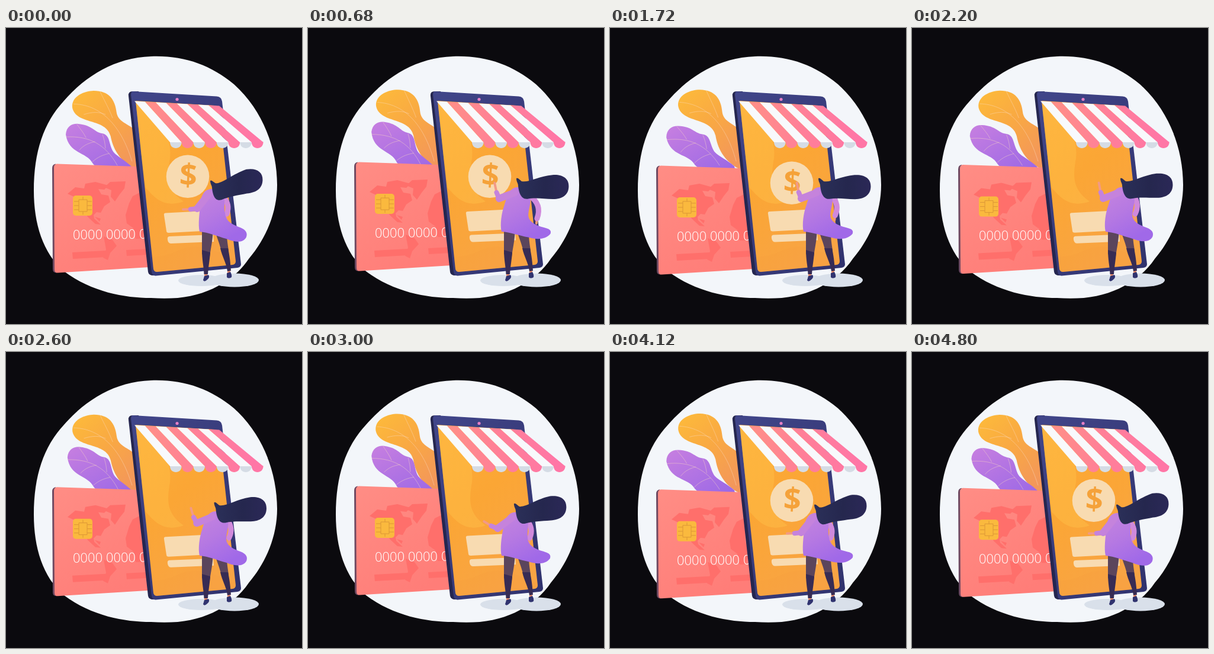
Write an HTML page that moves like this. It is 500 px wide and 500 px high and loops after 4840 ms.

```html
<!DOCTYPE html>
<html lang="en">
<head>
<meta charset="utf-8">
<title>Mobile shop</title>
<style>
html, body { margin: 0; width: 100%; height: 100%; overflow: hidden; background: #0b0a0e; }
svg { display: block; width: 100vw; height: 100vh; }
text { font-family: "Open Sans", sans-serif; }
.vein { fill: none; stroke: #fbd9c0; stroke-width: .7; stroke-linecap: round; opacity: .65; }
.limb { fill: none; stroke-linecap: round; stroke-linejoin: round; }
</style>
</head>
<body>
<svg viewBox="0 0 500 500">
  <defs>
    <linearGradient id="gold" x1="0" y1="0" x2=".7" y2="1">
      <stop offset="0" stop-color="#fdbb3a"/><stop offset=".5" stop-color="#f9a943"/><stop offset="1" stop-color="#f3975a"/>
    </linearGradient>
    <linearGradient id="violet" x1="0" y1="0" x2=".8" y2="1">
      <stop offset="0" stop-color="#c77fe0"/><stop offset="1" stop-color="#9b68e6"/>
    </linearGradient>
    <linearGradient id="coral" x1="0" y1="0" x2=".6" y2="1">
      <stop offset="0" stop-color="#ff8d85"/><stop offset="1" stop-color="#ff7d78"/>
    </linearGradient>
    <linearGradient id="screen" x1="0" y1="0" x2=".5" y2="1">
      <stop offset="0" stop-color="#fcae38"/><stop offset=".5" stop-color="#fba635"/><stop offset="1" stop-color="#f8a444"/>
    </linearGradient>
    <linearGradient id="frame" x1="0" y1="0" x2="1" y2="1">
      <stop offset="0" stop-color="#41468a"/><stop offset="1" stop-color="#30326d"/>
    </linearGradient>
    <linearGradient id="pink" gradientUnits="userSpaceOnUse" x1="230" y1="0" x2="420" y2="0">
      <stop offset="0" stop-color="#ff9086"/><stop offset=".5" stop-color="#ff7f98"/><stop offset="1" stop-color="#ff76a6"/>
    </linearGradient>
    <linearGradient id="cloth" x1="0" y1="0" x2=".5" y2="1">
      <stop offset="0" stop-color="#c685de"/><stop offset=".5" stop-color="#b679e2"/><stop offset="1" stop-color="#a069e8"/>
    </linearGradient>
    <linearGradient id="locks" x1="0" y1="0" x2="1" y2="0">
      <stop offset="0" stop-color="#2b3059"/><stop offset=".55" stop-color="#25274e"/><stop offset="1" stop-color="#2b2857"/>
    </linearGradient>
    <clipPath id="glass"><path d="M219 123L353 131Q359 132 360 138L388 394Q388 399 383 400L255 412Q250 412 249 407Z"/></clipPath>
  </defs>

  <rect width="500" height="500" fill="#0b0a0e"/>
  <path fill="#f3f6fa" d="M245 48C300 46 345 62 385 95C435 140 458 205 458 265C458 310 440 355 410 390C390 420 350 450 290 456C275 457 260 457 245 456C200 456 145 446 98 411C62 380 47 330 47 275C47 208 64 160 97 124C135 80 185 50 245 48Z"/>

  <g id="tall">
    <path fill="url(#gold)" d="M114.500 132C113 112 137 104.500 151 104.500C177 105 187 120 189 142C191 157 204 160 218 171L222 240C190 225 181 200 178 182C171 150 120 162 114.500 132Z"/>
    <path class="vein" d="M117 126C160 128 195 160 213 225M162 106C168 120 176 134 182 151M134 144C148 140 160 140 170 145"/>
  </g>
  <g id="low">
    <path fill="url(#violet)" d="M101 180C102 166 112 161 122 162C146 164 149 176 162 178C177 180 173 198 182 210C188 217 202 224 213 235L216 250L170 250C162 236 152 237 146 228C136 209 106 213 101 180Z"/>
    <path class="vein" d="M102 184C140 182 168 196 188 232M120 163C126 171 131 177 135 185M163 180C166 188 167 194 168 203M124 206C132 197 141 194 150 192M146 226C156 217 165 214 174 212"/>
  </g>

  <g id="card">
    <path fill="#6f4961" d="M84 229.500Q78 230 78 237L79 407Q79 414 86 413.500Z"/>
    <path fill="url(#coral)" d="M86 229.500L250 235V403.500L87 413.500Q82 413.500 82 408L81 236Q81 230 86 229.500Z"/>
    <g fill="#ff6f6b">
      <path d="M104 280L117 269L132 271L134 263L151 260L173 266L166 273L156 272L161 281L173 283L176 294L166 301L160 312L153 311L148 316L149 322L160 332L151 331L138 319L128 301L117 286Z"/>
      <path d="M166 269L176 260L202 259L200 271L192 281L184 293L177 285L178 274Z"/>
      <path d="M150 319L160 322L158 327ZM208 296L214 284L228 277L228 315L235 340L229 356L219 356L215 338L204 330L202 316Z"/>
      <path d="M165 352L180 358L187 368L176 380L172 392L164 388L169 374Z"/>
      <path d="M112 379L168 376V387L113 390ZM203 375L240 373V383L204 385Z"/>
    </g>
    <rect x="113" y="283" width="33" height="34" rx="5" fill="#fab93e"/>
    <path fill="none" stroke="#dc9636" stroke-width="1" d="M123 290h14v20h-14zM115 293h8M115 300h8M115 307h8M137 293h8M137 300h8M137 307h8M130 285v5M130 310v5"/>
    <text x="113" y="357" font-size="22" font-weight="300" fill="#fff" transform="rotate(-.6 112 357)">0000 0000 0000</text>
  </g>

  <path fill="#25264f" d="M214 107Q206 107 207 115L240 412Q241 418 249 418L260 412L224 107Z"/>
  <path fill="url(#frame)" d="M214 107L356 115.500Q364 116 365 124L397 399Q397 404 391 405L253 418.500Q247 419 246 412L211 113Q211 108 214 107Z"/>
  <g clip-path="url(#glass)">
    <rect x="210" y="115" width="190" height="305" fill="url(#screen)"/>
    <path fill="#ffc24d" opacity=".4" d="M215 120L235 137C268 162 280 190 277 220C270 258 275 275 300 293C265 305 250 285 236 270Z"/>
    <path fill="#f39a3d" opacity=".2" d="M245 385C285 390 295 360 340 372C365 378 375 392 390 388V415H245Z"/>
    <g id="bars" fill="#f8dbb1">
      <path d="M270 312.500L346 308.500L349 342L275 346Q271 346 271 343L267 316.500Q266 312.500 270 312.500Z"/>
      <path d="M276 352L350 349L351 361L279 364Q274 364 273 358Q272 352 276 352Z"/>
    </g>
    <g id="coin">
      <circle cx="307" cy="250.800" r="36.300" fill="#f8dbb1"/>
      <text x="308" y="266.500" font-size="52" font-weight="700" fill="#f5a23a" text-anchor="middle" transform="rotate(3 308 249)">$</text>
    </g>
  </g>
  <circle cx="289" cy="120.500" r="2.600" fill="#e67fc6"/>
  <g id="awning"></g>

  <g fill="#d9e0ea">
    <ellipse cx="330" cy="426.500" rx="39" ry="9.500"/>
    <ellipse cx="386" cy="426" rx="41" ry="11.500"/>
  </g>

  <g>
    <path fill="#f0936f" d="M335 412h5v9h-5zM374 406h5v10h-5z"/>
    <path fill="#5b455c" d="M331 340L350 340C349 360 346 372 344 386L331 382Z"/>
    <path fill="#372c54" d="M331 375L345 379C344 393 342 402 341 416L334.500 416C334 402 331 392 331 375Z"/>
    <path fill="#5b455c" d="M353 342L373 345C373 358 375 368 376 376L364 378C361 364 356 354 353 342Z"/>
    <path fill="#372c54" d="M362 372L375 372C378 386 379 396 380 410L374 411C372 396 365 386 362 372Z"/>
    <path fill="#30336f" d="M335 419L342 417Q345 421 340 425Q335 430 333 426ZM373 414L379 412Q382 417 381 421Q376 424 373 421Z"/>
  </g>
  <path id="backHand" class="limb" stroke="#f29a74" stroke-width="4"/>
  <path id="backArm" class="limb" stroke="#d089dc" stroke-width="9"/>
  <path id="dress" fill="url(#cloth)"/>
  <path id="hand" class="limb" stroke="#f29a86" stroke-width="4"/>
  <path id="upper" class="limb" stroke="#c583dc" stroke-width="12"/>
  <path id="fore" class="limb" stroke="#c583dc" stroke-width="8"/>
  <path id="hair" fill="url(#locks)"/>
</svg>
<script>
const LOOP = 4840;
const $ = id => document.getElementById(id);
const set = (id, name, value) => $(id).setAttribute(name, value);
const span = (t, from, to) => Math.min(1, Math.max(0, (t - from) / (to - from)));
const smooth = p => p * p * (3 - 2 * p);
const mix = (a, b, p) => a + (b - a) * p;
const pt = (x, y) => x.toFixed(2) + " " + y.toFixed(2);

function buildAwning() {
  let out = "";
  for (let i = 0; i < 8; i++) {
    const top = n => pt(217 + 17.9 * n, 123.5 + n);
    const x0 = 277 + 19.7 * i, x1 = x0 + 19.7;
    const odd = i % 2;
    out += `<path fill="${odd ? "url(#pink)" : "#d5dce5"}" d="M${x0} 192.5C${x0} 206.5 ${x1} 206.5 ${x1} 192.5Z"/>`;
    out += `<path fill="${odd ? "url(#pink)" : "#f8f9fc"}" d="M${top(i)}L${top(i + 1)}L${x1} 193L${x0} 193Z"/>`;
  }
  $("awning").innerHTML = out;
}

// Start point, then triples for cubic curves; the tail bends upward by lift.
const HAIR = [[352, 254], [354, 252], [357, 256], [361, 259], [372, 262], [390, 251], [413, 250],
  [430, 249], [441, 256], [440.5, 270], [440, 284], [430, 291], [414, 291],
  [398, 290], [384, 287], [371, 289], [359, 290], [356, 276], [355, 266], [355, 262], [352, 260], [352, 254]];

function hairPath(dx, dy, lift) {
  const p = HAIR.map(([x, y]) => pt(x + dx, y + dy - lift * smooth(span(x, 352, 428))));
  return "M" + p[0] + "C" + p.slice(1).join(" ") + "Z";
}

function dressPath(a, k) {
  const s = 7 * a, r = 3 * a;
  return "M" + pt(346 + s, 272 - r) +
    "C" + [pt(333 + s, 273 - r), pt(329 + s, 286), pt(328 + s / 2, 300),
      pt(327, 312), pt(324, 332), pt(327, 344)].join(" ") +
    "C" + [pt(342, 345), pt(357, 352 - 2 * k), pt(372, 356 - 4 * k),
      pt(386, 362 - 7 * k), pt(401, 364 - 10 * k), pt(406 + 6 * k, 353 - 9 * k)].join(" ") +
    "C" + [pt(409 + 6 * k, 344 - 8 * k), pt(402 + 2 * k, 339 - k), pt(393, 336 - k),
      pt(380, 331), pt(371, 325), pt(370 + s / 3, 313)].join(" ") +
    "C" + [pt(367 + s, 300), pt(372 + s, 290), pt(366 + s, 280 - r),
      pt(362 + s, 272 - r), pt(354 + s, 271 - r), pt(346 + s, 272 - r)].join(" ") + "Z";
}

function drawArm(a) {
  const ex = 321 - 12 * a * (1 - a), ey = mix(306, 289, a);
  const ang = mix(179, 259, a) * Math.PI / 180;
  const len = mix(23, 29, a);
  const at = d => pt(ex + d * Math.cos(ang), ey + d * Math.sin(ang));
  const elbow = pt(ex + 2, ey - 1);
  set("upper", "d", `M${pt(342 + 7 * a, 281 - 3 * a)}L${elbow}`);
  set("fore", "d", `M${elbow}L${at(len * .4)}`);
  set("hand", "d", `M${at(len * .5)}L${at(len - 1)}`);
}

function draw(t) {
  const w = 4 * Math.PI * t / LOOP;
  const s = Math.sin(w), c = Math.cos(w);
  set("card", "transform", `translate(0 ${-3 * s})`);
  set("low", "transform", `rotate(${3.2 * s} 185 290)`);
  set("tall", "transform", `rotate(${-1.4 * c} 212 235)`);
  set("bars", "transform", `translate(0 ${2 * c - 2})`);

  // The coin sinks out of sight, then rises back.
  const away = t < 2600;
  const drop = away ? 60 * span(t, 1400, 2150) ** 2 : 35 * (1 - span(t, 3040, 3640)) ** 2;
  const shown = away ? 1 - span(t, 1720, 2120) : span(t, 3080, 3400);
  set("coin", "transform", `translate(0 ${drop})`);
  set("coin", "opacity", shown);

  const raise = smooth(span(t, 40, 720));
  const a = raise * (1 - smooth(span(t, 2440, 3440)));
  const b = raise * (1 - span(t, 720, 2200));
  const k = (1 - c) / 2;
  drawArm(a);
  set("dress", "d", dressPath(a, k));
  const hx = 373 + 4 * a + 10 * b, hy = 314 + 8 * b;
  set("backArm", "d", `M${pt(367 + 7 * a, 286 - 3 * a)}Q${pt(379 + 6 * a + 11 * b, 298)} ${pt(hx, hy)}`);
  set("backHand", "d", `M${pt(hx, hy)}L${pt(hx - 1, hy + 8)}`);
  set("hair", "d", hairPath(-7 * (1 - a), 4 * (1 - a), 17 - 5 * k - 12 * a));
}

buildAwning();
const start = performance.now();
function tick() {
  draw((performance.now() - start) % LOOP);
  requestAnimationFrame(tick);
}
tick();
</script>
</body>
</html>
```
